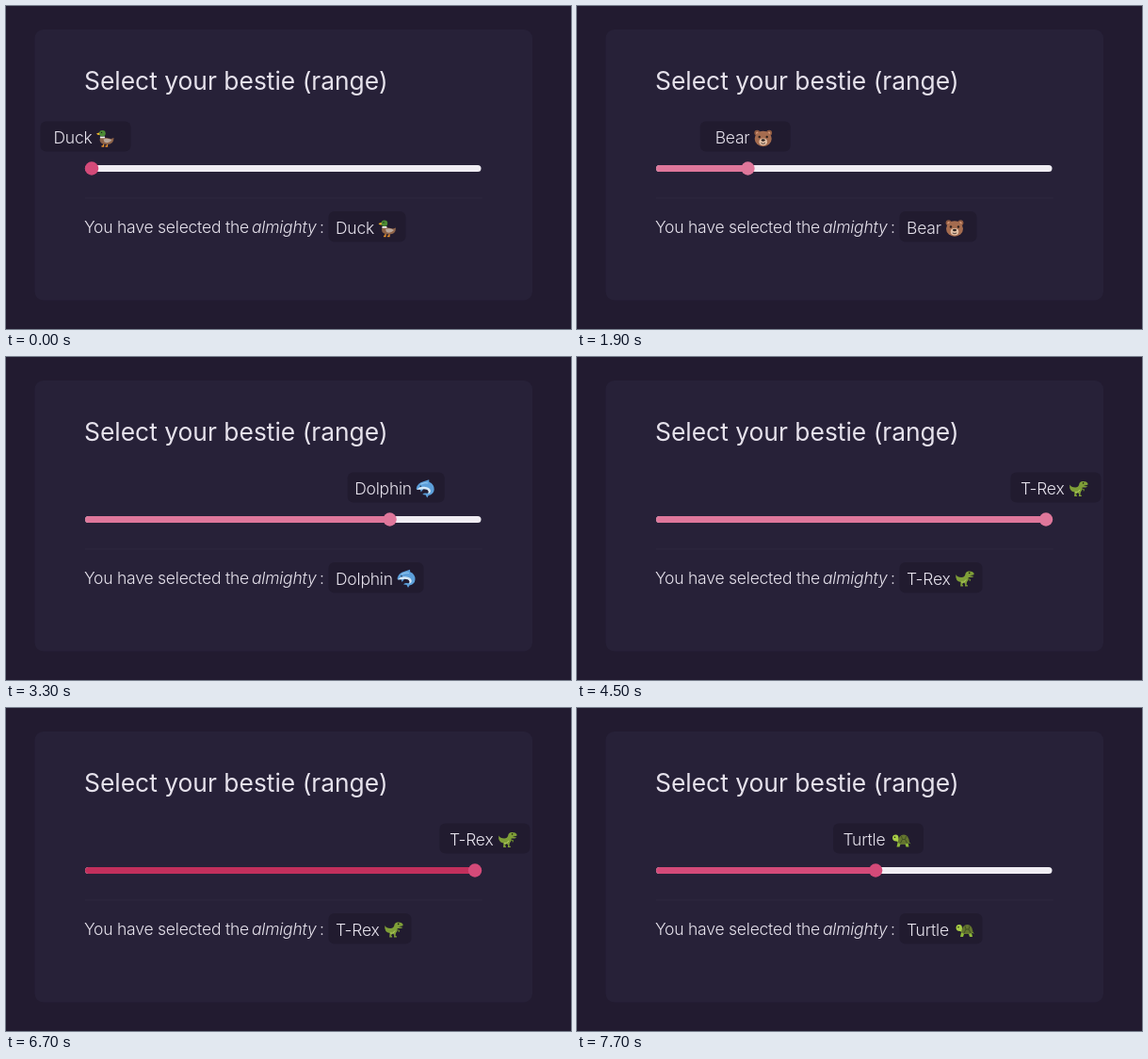
Animation of 600x343 px, one loop 9.2 s. Source, as an HTML page:

```html
<!DOCTYPE html>
<html lang="en">
<head>
<meta charset="utf-8">
<title>Range picker</title>
<style>
  html, body { margin: 0; width: 100%; height: 100%; overflow: hidden; background: #221b30; }
  svg { display: block; }
  #stage { width: 100vw; height: 100vh; }
  text { font: 300 17.5px Inter, "Open Sans", sans-serif; letter-spacing: -.22px; fill: #e6e2ec; }
  .title { font-size: 26.4px; font-weight: 400; letter-spacing: 0; }
  .italic { font-style: italic; }
  .box { fill: #211b2f; }
</style>
</head>
<body>
<svg id="stage" viewBox="0 0 600 343">
  <defs>
    <g id="duck">
      <path d="M8 16.500v2.500h-2M12 16.500v2.500h-2" fill="none" stroke="#e8912d" stroke-width="1.300"/>
      <path d="M5 9q3 0 6 1l5 1 3-1q0 7-7 7-8 0-8-5z" fill="#8d6248"/>
      <path d="M8 11.500q5-2 9 1-4 4-8 2z" fill="#b9a79b"/>
      <path d="M4.500 8.500h4.800l.3 1.800H4.300z" fill="#eee"/>
      <path d="M5.500 3.800L.5 5.500q1 1.800 4.500 1.500z" fill="#f2b52c"/>
      <circle cx="6.900" cy="5.200" r="3.300" fill="#4c8a35"/>
      <circle cx="6" cy="4.400" r=".7" fill="#1d1d1d"/>
    </g>
    <g id="bear">
      <g fill="#8f5a41"><circle cx="3.600" cy="4.800" r="3"/><circle cx="16.400" cy="4.800" r="3"/></g>
      <g fill="#d99a7a"><circle cx="3.800" cy="5" r="1.500"/><circle cx="16.200" cy="5" r="1.500"/></g>
      <ellipse cx="10" cy="11" rx="9" ry="8.300" fill="#a56c4f"/>
      <ellipse cx="10" cy="14.300" rx="4.300" ry="3.700" fill="#e3c0a5"/>
      <g fill="#2b201d"><ellipse cx="10" cy="12.500" rx="2" ry="1.300"/><circle cx="6" cy="9" r="1.200"/><circle cx="14" cy="9" r="1.200"/></g>
      <path d="M7.800 15.500q2.200 1.600 4.400 0" fill="none" stroke="#2b201d" stroke-width=".8"/>
    </g>
    <g id="dolphin">
      <path d="M.5 9.500Q2 3.500 8 2.300L14 .3l.2 2.400q5.500 2.300 5.300 8-.3 5-6 6.300L12 19.500 10.500 16.500 7 16q2-2 5-1.200 3-1 2.300-3.300-2-2-6-1.500L5.500 13.500 4.800 10.800 1 11z" fill="#5c9fda"/>
      <path d="M1 10.700Q4 7.300 9 7.800q6 .4 6.700 4.200.2 2.500-2.700 3.200 1.500-3-1.500-4.500-3-1-6.500 0z" fill="#d6e9f7"/>
      <path d="M5 5.300Q9 3 13 4" fill="none" stroke="#8dc3ec" stroke-width="1.200"/>
      <circle cx="5" cy="7.300" r=".8" fill="#1e2b3a"/>
    </g>
    <g id="trex" transform="matrix(-1 0 0 1 20 0)">
      <path d="M.5 4Q2 1.500 6.500 2q3 .5 3.200 3.500.8 3 4 3 4.500 0 6-3Q20.500 12.500 14.500 13.500l.3 4.500h-3l.2-1.200 1-.3-1.200-2.500-2 1.200.2 2.800H7l.2-1.200 1.300-.3-.5-3Q5.800 11.500 6.300 8.500H2.500L.5 7.500l4.500-.8L.5 5.800z" fill="#7f9f38"/>
      <path d="M6.800 10l-2.300.8.4 1.500" fill="none" stroke="#68862f" stroke-width="1.200"/>
      <path d="M9 11q2 4 5 2.500" fill="none" stroke="#b6cf64"/>
      <circle cx="5.300" cy="3.900" r=".8" fill="#20240f"/>
    </g>
    <g id="turtle">
      <path d="M6 13l-1 4.500h3l1-3h5l1 3h3L17 13l3 1.200-3-3z" fill="#8fb93a"/>
      <path d="M7 14.500Q6 11 4.500 11.500.5 11.500.5 7.800.8 4.500 4 4.500q3 .2 3 4l1.500 3z" fill="#a9cf46"/>
      <path d="M6 13Q7 4.500 12.500 4.500q5 .3 6 7.500-1 2.500-6.500 2.500-4 0-6-1.500z" fill="#64752f"/>
      <path d="M10 6l1 3.500-2 4M15 6l-1 3.500 2 4M11 9.500h3" fill="none" stroke="#3e4c22" stroke-width=".9"/>
      <circle cx="3" cy="7.300" r=".8" fill="#20240f"/>
    </g>
    <g id="rabbit">
      <g fill="#d8d2d4"><ellipse cx="6.500" cy="5" rx="2" ry="5"/><ellipse cx="13.500" cy="5" rx="2" ry="5"/><circle cx="10" cy="13" r="6.500"/></g>
      <g fill="#2b201d"><circle cx="7.300" cy="12" r="1"/><circle cx="12.700" cy="12" r="1"/></g>
      <circle cx="10" cy="14.500" r="1.200" fill="#e58aa0"/>
    </g>
    <g id="tiger">
      <g fill="#efa736"><circle cx="4" cy="4.500" r="2.800"/><circle cx="16" cy="4.500" r="2.800"/><circle cx="10" cy="11" r="8.500"/></g>
      <ellipse cx="10" cy="14.500" rx="4.500" ry="3.500" fill="#f7ead6"/>
      <path d="M10 3v4M7.500 4v2M12.500 4v2M2 11h3M15 11h3" stroke="#2b201d"/>
      <g fill="#2b201d"><circle cx="6.500" cy="9.500" r="1.100"/><circle cx="13.500" cy="9.500" r="1.100"/><circle cx="10" cy="13" r="1.300"/></g>
    </g>
    <g id="frog">
      <g fill="#8ab83c"><circle cx="5" cy="5.500" r="3.500"/><circle cx="15" cy="5.500" r="3.500"/><ellipse cx="10" cy="12" rx="9" ry="6.500"/></g>
      <g fill="#20240f"><circle cx="5" cy="5.500" r="1.500"/><circle cx="15" cy="5.500" r="1.500"/></g>
      <path d="M4 12.500q6 4 12 0" fill="none" stroke="#3e4c22"/>
    </g>
    <g id="whale">
      <path d="M1 10q1-5 7-5 6 .5 7 5l1-3-1-3 3 1 2-1q0 4-2 5-1 8-9 8-8-.5-8-7z" fill="#5aa2dc"/>
      <path d="M2 13q5 1 9 0-1 4-5 3.500-3-.5-4-3.500z" fill="#c8e2f4"/>
      <circle cx="5" cy="10" r="1" fill="#1e2b3a"/>
    </g>
    <g id="lion">
      <circle cx="10" cy="10" r="9.500" fill="#a5622c"/>
      <circle cx="10" cy="11" r="6.500" fill="#efb548"/>
      <g fill="#2b201d"><circle cx="7.300" cy="9.500" r="1"/><circle cx="12.700" cy="9.500" r="1"/><ellipse cx="10" cy="12.500" rx="1.600" ry="1.100"/></g>
    </g>
  </defs>

  <rect width="600" height="343" fill="#221b30"/>
  <rect x="30.500" y="25" width="528.500" height="287.500" rx="9" fill="#272138"/>
  <text class="title" x="83" y="88.500">Select your bestie (range)</text>

  <g id="label">
    <rect class="box" y="122.500" height="32" rx="6"/>
    <text y="146"></text>
    <use y="130"/>
  </g>

  <rect x="84" y="169" width="420.500" height="7" rx="3.500" fill="#f0edf3"/>
  <rect id="fill" x="84" y="169" height="7" rx="3.500"/>
  <circle id="thumb" cy="172.500" r="7.200"/>

  <rect x="84" y="203.500" width="422" height="1" fill="#2f293f"/>
  <text x="83" y="240.500">You have selected the</text>
  <text class="italic" x="261" y="240.500">almighty</text>
  <text x="333" y="240.500">:</text>

  <g id="result">
    <rect class="box" y="218" height="32.500" rx="6"/>
    <text y="241.500"></text>
    <use y="225.500"/>
  </g>
</svg>
<script>
  const LOOP = 9200;
  const NORMAL = ["#d44a79", "#d44a79"];
  const HOVER = ["#df779b", "#df779b"];
  const DEEP = ["#c22f5c", "#d44a79"];

  // name, icon, icon offset from the text start
  const PETS = [
    ["Duck", "duck", 45],
    ["Rabbit", "rabbit", 56],
    ["Bear", "bear", 41],
    ["Tiger", "tiger", 46],
    ["Frog", "frog", 42],
    ["Turtle", "turtle", 52],
    ["Whale", "whale", 54],
    ["Dolphin", "dolphin", 65],
    ["Lion", "lion", 38],
    ["T-Rex", "trex", 52]
  ];

  // start time, slider value, [fill, thumb]
  const STEPS = [
    [0, 0, NORMAL], [1000, 0, HOVER], [1400, 1, HOVER], [1800, 2, HOVER],
    [2400, 3, HOVER], [2500, 4, HOVER], [2800, 5, HOVER], [2900, 6, HOVER],
    [3300, 7, HOVER], [3900, 8, HOVER], [4400, 9, HOVER], [5000, 9, NORMAL],
    [6700, 9, DEEP], [7000, 5, HOVER], [7200, 5, NORMAL]
  ];

  const $ = id => document.getElementById(id);
  const set = (el, attrs) => {
    for (const key in attrs) el.setAttribute(key, attrs[key]);
  };

  function drawTag(id, pet, textX, boxX, boxWidth) {
    const [box, text, icon] = $(id).children;
    const [name, art, offset] = pet;
    set(box, { x: boxX, width: boxWidth });
    set(text, { x: textX });
    text.textContent = name;
    set(icon, { href: "#" + art, x: textX + offset });
  }

  function draw([, value, [fill, thumb]]) {
    const pet = PETS[value];
    const width = pet[2] + 20;
    const center = 84.5 + 47.1 * value;
    const boxWidth = Math.max(96, width + 18);
    drawTag("label", pet, center - width / 2 - 1.5, center - boxWidth / 2, boxWidth);
    drawTag("result", pet, 350, 342.5, Math.max(82, width + 16));

    const x = 91 + 407 / 9 * value;
    set($("fill"), { width: x - 84, fill });
    set($("thumb"), { cx: x, fill: thumb });
  }

  let shown;
  function tick() {
    const time = performance.now() % LOOP;
    const step = STEPS.findLast(([start]) => start <= time);
    if (step !== shown) draw(shown = step);
    requestAnimationFrame(tick);
  }
  tick();
</script>
</body>
</html>
```
